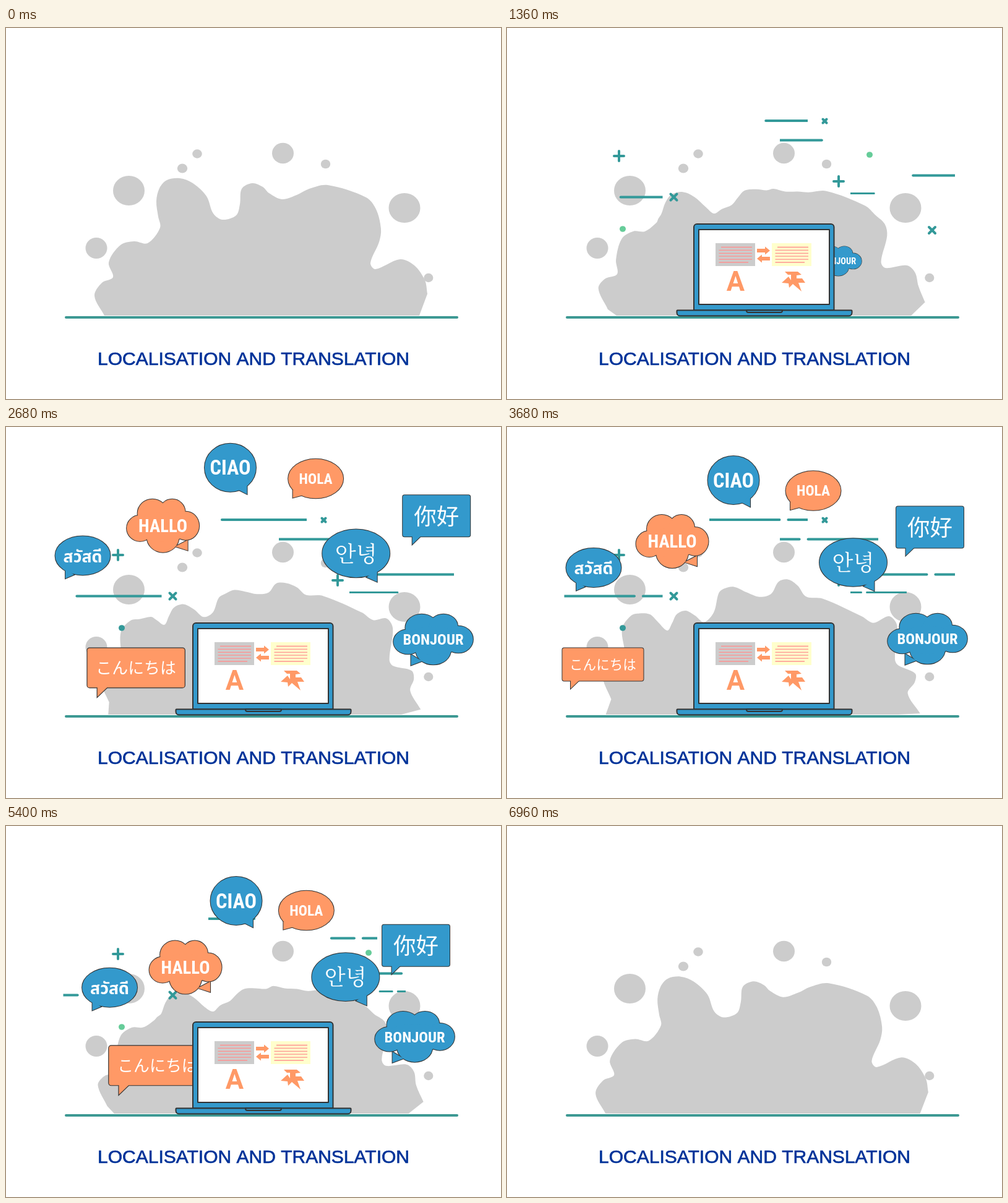
These frames come from a looping animation (800 px wide and 600 px high, 7 s). An HTML page with a canvas:

```html
<!DOCTYPE html>
<html lang="en">
<head>
<meta charset="utf-8">
<title>Localisation and translation</title>
<style>
html, body { margin: 0; width: 100%; height: 100%; overflow: hidden; background: #fff; }
canvas { display: block; width: 800px; height: 600px; }
</style>
</head>
<body>
<canvas id="stage" width="800" height="600"></canvas>
<script>
const ctx = document.getElementById('stage').getContext('2d');
const LOOP = 7000;
const GREY = '#cccccc', TEAL = '#339999', GREEN = '#66cc99', BLUE = '#3399cc';
const SALMON = '#ff9966', DARK = '#333333', CREAM = '#ffffcc', PINK = '#ff9090';
const HUB = [414, 400];

const clamp = v => Math.max(0, Math.min(1, v));
const mix = (a, b, k) => a + (b - a) * k;
const ramp = (t, from, to) => clamp((t - from) / (to - from));
const easeOut = k => 1 - (1 - k) * (1 - k);

// Splash outline in its two end poses, as x, y pairs
const NEAR = [
  189,465, 159,465, 143,433, 155,412, 173,403, 166,379, 185,351, 207,345, 229,348, 249,323,
  246,305, 243,280, 248,259, 260,246, 281,243, 302,251, 324,272, 335,300, 350,310, 372,303,
  378,285, 381,260, 398,251, 415,257, 425,267, 446,277, 470,270, 490,260, 520,254, 582,274,
  598,293, 606,325, 603,346, 589,380, 597,390, 637,374, 660,384, 677,408, 681,430, 668,465
];
const FAR = [
  158,465, 169,439, 155,403, 163,396, 186,390, 192,368, 186,325, 200,303, 213,299, 230,302,
  242,314, 260,332, 268,320, 275,306, 289,300, 304,308, 318,318, 334,300, 342,266, 350,259,
  366,257, 388,268, 408,276, 427,271, 440,249, 455,245, 470,256, 483,275, 510,279, 573,308,
  592,318, 618,305, 632,320, 629,375, 634,385, 661,400, 659,414, 646,432, 667,465, 630,465
];

const SPOTS = [
  [198.5, 263, 25.5, 24], [146, 356, 17.5, 17], [447.5, 202.5, 17.5, 16.7], [516.5, 220, 7.7, 7.3],
  [309, 203.5, 7.8, 7.2], [285, 227, 8.2, 7.6], [644, 291, 25.5, 24], [682.8, 404, 7.6, 7.2]
];

// x, y, direction, scale
const DASHES = [[486, 150, -1, 1], [441, 181.5, 1, 1], [724, 238.5, -1, 1], [251.5, 273.5, -1, 1], [555, 267.5, 1, 0.572]];

const oval = (x, y, rx, ry) => () => ctx.ellipse(x, y, rx, ry, 0, 0, 7);
const poly = pts => () => {
  for (let i = 0; i < pts.length; i += 2) ctx.lineTo(pts[i], pts[i + 1]);
  ctx.closePath();
};
const tail = (x, y) => poly([x / 2, y * 0.84, x, y, x, y * 0.58]);
const balloon = (rx, ry, x, y) => [oval(0, 0, rx, ry), tail(x, y)];
const board = (w, h, x) => [
  () => ctx.roundRect(-w, -h, 2 * w, 2 * h, 3),
  poly([x, h - 1, x, h + 12.5, x + 14, h - 1])
];
const LOBES = [[-37, 4, 21.5, 21], [-17, -20, 24, 23], [15, -22, 21, 21], [37, 0, 21.5, 23], [0, 18, 26, 25], [0, 2, 44, 24]];
const cloud = (sx, sy, x, y) => [tail(x, y),
  ...LOBES.map(([a, b, rx, ry]) => oval(a * sx, b * sy, rx * sx, ry * sy))];

const LATIN = 'bold condensed 100px "Liberation Sans Narrow", "Roboto Condensed", "Open Sans", "Noto Sans", sans-serif';
const THAI = 'bold 100px "Noto Sans Thai", "Noto Sans", "Noto Serif", sans-serif';
const HAN = '300 100px "Noto Sans CJK SC", "Noto Sans CJK", sans-serif';
const KANA = '300 100px "Noto Sans CJK JP", "Noto Sans CJK", sans-serif';
const HANGUL = '300 100px "Noto Serif CJK KR", "Noto Serif", "Noto Sans CJK KR", serif';

const bubbles = [];
// at: place halfway through, v: drift per second, on/off: travel start times
function bubble(text, font, width, fill, parts, at, v, on, off, over = 1, grow = 1.4) {
  bubbles.push({ text, font, width, fill, parts, at, v, on, off, over, grow });
}
bubble('BONJOUR', LATIN, 98, BLUE, cloud(1.1, 0.95, -36, 42), [679.5, 342.5], [-11, -1], 1200, 5880);
bubble('你好', HAN, 73, BLUE, board(54.5, 33.5, -39), [683.5, 162], [-12.2, 18.2], 1280, 5850);
bubble('안녕', HANGUL, 68, BLUE, balloon(54.5, 38.8, 34, 46), [559.5, 219], [-6.2, 14.6], 1505, 5830, 1.2);
bubble('HOLA', LATIN, 54, SALMON, balloon(44.5, 31.8, -37, 31), [495, 103], [-5.6, 19.5], 1574, 5800);
bubble('CIAO', LATIN, 66, BLUE, balloon(41.5, 39, 27, 43), [366, 86], [3.5, 20.3], 1748, 5560);
bubble('HALLO', LATIN, 79, SALMON, cloud(1, 1, 40, 40), [267, 185], [13.4, 25.3], 1800, 5420);
bubble('สวัสดี', THAI, 63, BLUE, balloon(44.5, 31.5, -28, 37), [140, 227.5], [16, 19.6], 1790, 5420);
bubble('こんにちは', KANA, 108, SALMON, board(65.5, 26.5, -52), [155, 384], [-27, -4], 2238, 5000, 1.2, 2.2);

function fillPath(color, path) {
  ctx.beginPath();
  path();
  ctx.fillStyle = color;
  ctx.fill();
}

function stroke(color, width, pts) {
  ctx.beginPath();
  for (let i = 0; i < pts.length; i += 2) ctx.lineTo(pts[i], pts[i + 1]);
  ctx.strokeStyle = color;
  ctx.lineWidth = width;
  ctx.stroke();
}

function drawSplash(u) {
  const q = NEAR.map((v, i) => mix(v, FAR[i], u / 3500));
  const n = q.length / 2, last = n - 2;
  const pt = j => [q[2 * j], q[2 * j + 1]];
  fillPath(GREY, () => {
    ctx.moveTo(...pt(0));
    ctx.lineTo(...pt(1));
    for (let j = 1; j < last; j++) {
      const a = pt(Math.max(1, j - 1)), b = pt(j), c = pt(j + 1), d = pt(Math.min(last, j + 2));
      const len = Math.hypot(c[0] - b[0], c[1] - b[1]);
      const k1 = len / 3 / Math.max(1, Math.hypot(c[0] - b[0], c[1] - b[1]) + Math.hypot(b[0] - a[0], b[1] - a[1]));
      const k2 = len / 3 / Math.max(1, len + Math.hypot(d[0] - c[0], d[1] - c[1]));
      ctx.bezierCurveTo(b[0] + (c[0] - a[0]) * k1, b[1] + (c[1] - a[1]) * k1,
        c[0] - (d[0] - b[0]) * k2, c[1] - (d[1] - b[1]) * k2, c[0], c[1]);
    }
    ctx.lineTo(...pt(n - 1));
  });
  for (const s of SPOTS) fillPath(GREY, oval(...s));
}

// A long dash, a gap and a short dash slide along a fixed track
function drawDashes(t) {
  const head = 0.0525 * (t - 32);
  for (const [x, y, dir, s] of DASHES) {
    ctx.save();
    ctx.translate(x, y);
    ctx.scale(dir * s, 1);
    ctx.beginPath();
    ctx.rect(0, -4, 159, 8);
    ctx.clip();
    ctx.lineCap = 'round';
    for (const [a, b] of [[head - 148, head], [head - 199, head - 158]])
      if (b > 0 && a < 159) stroke(TEAL, s < 1 ? 3 : 4, [a + 2, 0, b - 2, 0]);
    ctx.restore();
  }
}

function drawPlus(x, y, u) {
  const r = 8 * easeOut(ramp(u, 200, 480));
  if (!r) return;
  stroke(TEAL, 4, [x - r, y, x + r, y]);
  stroke(TEAL, 4, [x, y - r, x, y + r]);
}

// Four arms fly in one after another and meet
function drawCross(x, y, u, start, size) {
  [[1, -1, 0], [1, 1, 60], [-1, -1, 130], [-1, 1, 280]].forEach(([dx, dy, wait]) => {
    const k = ramp(u, start + wait, start + wait + 320);
    if (!k) return;
    const off = 11 * (1 - k), end = off + mix(2, size, Math.min(1, k * 2));
    stroke(TEAL, 4, [x + dx * off, y + dy * off, x + dx * end, y + dy * end]);
  });
}

function drawMarks(u) {
  ctx.lineCap = 'round';
  drawPlus(181, 207, u);
  drawPlus(536, 248, u);
  drawCross(513.5, 150.5, u, 120, mix(5.5, 3, ramp(u, 680, 1100)));
  const arm = mix(7, 5, ramp(u, 680, 1000));
  drawCross(269.5, 273.5, u, 300, arm);
  drawCross(687, 327, u, 300, arm);
  const r = 10.8 * easeOut(ramp(u, 220, 480)) - 5.8 * ramp(u, 720, 1100);
  for (const [x, y] of [[187, 325], [586, 205]])
    fillPath(u > 1740 ? TEAL : GREEN, oval(x, y, r, r * 0.96));
}

function drawLabel(b) {
  ctx.font = b.font;
  const m = ctx.measureText(b.text), k = b.width / m.width;
  ctx.scale(k, k);
  ctx.fillStyle = '#fff';
  ctx.fillText(b.text, 0, (m.actualBoundingBoxAscent - m.actualBoundingBoxDescent) / 2);
}

function drawBubble(b, t) {
  let f = easeOut(ramp(t, b.on, b.on + 680));
  if (t > b.off) f = 1 - ramp(t, b.off, b.off + 600) ** 2;
  if (f <= 0) return;
  const s = mix(b.over * Math.min(1, f * b.grow), 1, ramp(f, 0.9, 1));
  const sec = (t - 3680) / 1000;
  const [x, y] = HUB.map((h, i) => mix(h, b.at[i] + b.v[i] * sec, f));
  ctx.save();
  ctx.translate(x, y);
  ctx.scale(s, s);
  ctx.lineJoin = 'miter';
  ctx.strokeStyle = DARK;
  ctx.lineWidth = 2;
  for (const part of b.parts) {
    ctx.beginPath();
    part();
    ctx.stroke();
  }
  for (const part of b.parts) fillPath(b.fill, part);
  drawLabel(b);
  ctx.restore();
}

function panel(x0, y0, x1, y1, r, fill) {
  fillPath(fill, () => ctx.roundRect(x0, y0, x1 - x0, y1 - y0, r));
  ctx.strokeStyle = DARK;
  ctx.lineWidth = 2;
  ctx.stroke();
}

function drawCard(x, fill) {
  ctx.fillStyle = fill;
  ctx.fillRect(x, 348, 64, 37);
  for (let i = 0; i < 6; i++) {
    const y = 354.5 + i * 4.9;
    stroke(PINK, 1.3, [x + (i ? 5.5 : 9), y, x + (i === 5 ? 53 : 59), y]);
  }
}

// Arrow pointing right from x, y; flip turns it round
function drawArrow(x, y, flip) {
  ctx.save();
  ctx.translate(x, y);
  ctx.scale(flip, 1);
  fillPath(SALMON, poly([0, -3, 13, -3, 13, -6.5, 21, 0, 13, 6.5, 13, 3, 0, 3]));
  ctx.restore();
}

function drawContent(s) {
  if (s <= 0) return;
  ctx.save();
  ctx.translate(414.5, 388);
  ctx.scale(s, s);
  ctx.translate(-414.5, -388);
  ctx.lineCap = 'butt';
  drawCard(337, GREY);
  drawCard(428, CREAM);
  drawArrow(404, 360, 1);
  drawArrow(425, 373, -1);
  fillPath(SALMON, poly([449, 394, 470, 394, 476, 399, 468, 400, 468, 405, 477, 405, 482, 412, 471, 412,
    476, 426, 462, 414, 456, 420, 455, 413, 444, 412, 455, 402, 459, 408, 459, 399, 454, 399]));
  ctx.font = 'bold 43.5px Roboto, "Liberation Sans", sans-serif';
  ctx.fillText('A', 369.3, 424.5);
  ctx.restore();
}

function drawLaptop(u) {
  const s = easeOut(ramp(u, 120, 520));
  if (!s) return;
  const k = easeOut(ramp(u, 620, 1000));
  ctx.save();
  ctx.translate(415, 465);
  ctx.scale(s, s);
  ctx.translate(-415, -465);
  ctx.lineJoin = 'round';
  const half = mix(67, 141.5, k), top = mix(458, 456.5, k), notch = mix(14, 29, k);
  panel(302, 317, 528.5, mix(457.5, 456.5, k), [5, 5, 0, 0], BLUE);
  panel(mix(303, 310, k), mix(321.5, 326, k), mix(528, 521, k), mix(451, 447, k), 0, '#fff');
  panel(416 - half, top, 416 + half, 465.5, [1, 1, 5, 5], BLUE);
  panel(416 - notch, top, 416 + notch, 460, [0, 0, 3, 3], BLUE);
  drawContent(easeOut(ramp(u, 350, 640)) * 1.07 - 0.07 * ramp(u, 680, 960));
  ctx.restore();
}

function drawTitle() {
  const title = 'LOCALISATION AND TRANSLATION';
  ctx.font = '30px "Liberation Sans", Arial, sans-serif';
  ctx.fillStyle = ctx.strokeStyle = '#003399';
  ctx.lineWidth = 0.7;
  ctx.fillText(title, 400, 544.5);
  ctx.strokeText(title, 400, 544.5);
}

function draw(t) {
  const u = Math.min(t, LOOP - t);
  ctx.fillStyle = '#fff';
  ctx.fillRect(0, 0, 800, 600);
  ctx.textAlign = 'center';
  drawSplash(u);
  drawDashes(t);
  drawMarks(u);
  ctx.lineCap = 'round';
  stroke('#3d9993', 4, [97, 468, 729, 468]);
  for (const b of bubbles) drawBubble(b, t);
  drawLaptop(u);
  drawTitle();
}

function tick(now) {
  draw(now % LOOP);
  requestAnimationFrame(tick);
}
draw(0);
requestAnimationFrame(tick);
</script>
</body>
</html>
```
